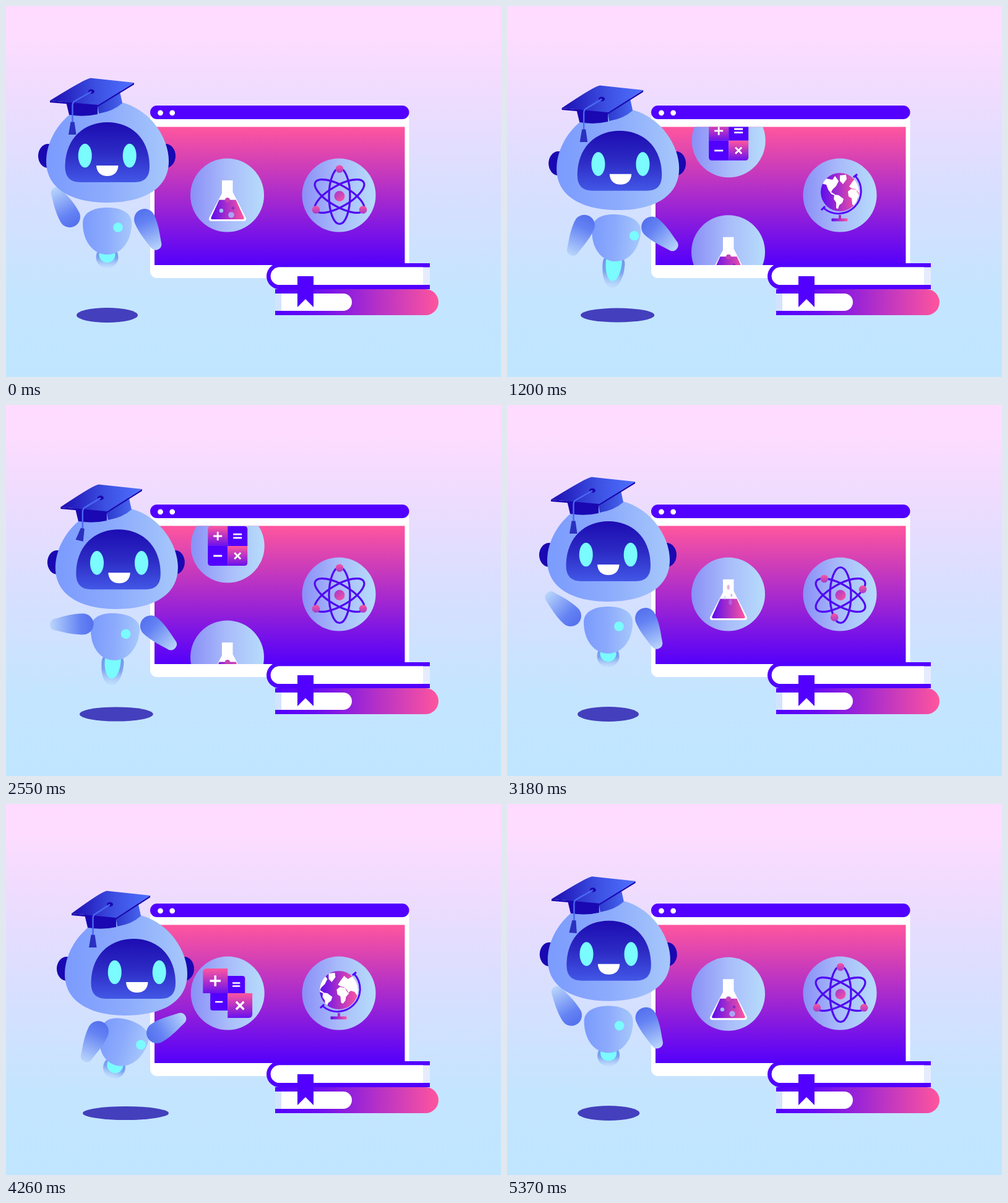
An HTML page for the animation above (5.4 s loop, 800 by 600 pixels).

```html
<!DOCTYPE html>
<html lang="en">
<head>
<meta charset="utf-8">
<title>Robot tutor</title>
<style>
html, body { margin: 0; width: 100%; height: 100%; overflow: hidden; background: #dcdfff; }
svg { display: block; width: 100%; height: 100%; }
</style>
</head>
<body>
<svg id="stage" viewBox="0 0 800 600"></svg>
<script>
const VIOLET = '#5200ff', PINK = '#ff569e', CYAN = '#7afbfe', NAVY = '#1a08b2';

// Gradient: 'h' runs left to right, 'v' top to bottom, 'd' diagonally.
const grad = (id, dir, ...stops) =>
  `<linearGradient id="${id}" x2="${dir === 'v' ? 0 : 1}" y2="${dir === 'h' ? 0 : 1}">` +
  stops.map(([o, c, a = 1]) => `<stop offset="${o}" stop-color="${c}" stop-opacity="${a}"/>`).join('') +
  '</linearGradient>';
const group = (id, inner = '') => `<g id="${id}">${inner}</g>`;
const path = (d, fill, extra = '') => `<path d="${d}" fill="${fill}" ${extra}/>`;
const rect = (x, y, w, h, fill, rx = 0) =>
  `<rect x="${x}" y="${y}" width="${w}" height="${h}" rx="${rx}" fill="${fill}"/>`;
const oval = (x, y, rx, ry, fill, id = '') =>
  `<ellipse ${id && `id="${id}"`} cx="${x}" cy="${y}" rx="${rx}" ry="${ry}" fill="${fill}"/>`;
const dot = (x, y, r, fill, id) => oval(x, y, r, r, fill, id);

const defs = `<defs>
  ${grad('sky', 'v', [0, '#ffdcff'], [.07, '#fedcff'], [.25, '#eedcfe'], [.5, '#d8dfff'], [.78, '#c4e5ff'], [1, '#c0e6ff'])}
  ${grad('screen', 'v', [0, PINK], [1, '#5400fb'])}
  ${grad('disc', 'h', [0, '#8a8ff7'], [.5, '#a9bcfa'], [1, '#b6dcfb'])}
  ${grad('warm', 'h', [0, '#5a0cf0'], [1, PINK])}
  ${grad('warmD', 'd', [0, '#a035d0'], [1, PINK])}
  ${grad('electron', 'v', [0, '#f9549f'], [1, '#a83bc8'])}
  ${grad('keyA', 'v', [0, PINK], [1, '#6a10ee'])}
  ${grad('cover', 'h', [0, VIOLET], [.25, '#6a0cf2'], [1, '#ff559d'])}
  ${grad('shell', 'h', [0, '#7b9bfe'], [.5, '#8dabfc'], [1, '#a6c8fb'])}
  ${grad('face', 'v', [0, '#1d0cb2'], [.5, '#2c2ac4'], [1, '#4257e6'])}
  ${grad('arm', 'h', [0, '#5470ee'], [.3, '#6482f3'], [1, '#b9d6fc'])}
  ${grad('board', 'h', [0, '#1c0eb2'], [.55, '#3c50e2'], [1, '#4f70ff'])}
  ${grad('band', 'h', [0, '#2c38cc'], [1, '#4765ef'])}
  ${grad('flame', 'v', [0, '#6f8fee'], [.55, '#7fa3f0'], [1, '#bcdcfb', .5])}
  <clipPath id="view"><rect x="240" y="195.5" width="404.5" height="223.5"/></clipPath>
  <clipPath id="ball"><circle cy="-5" r="31"/></clipPath>
</defs>`;

// Icons are drawn around the centre of their disc.
const disc = dot(0, 0, 59.5, 'url(#disc)');

const bubbles = [[-9.5, 25, 3.2, '#9fc2fb'], [6.5, 32, 4.8, '#a9a4f6'], [.5, 8, 4, '#c244b4'], [9.5, 21, 2.4, '#8a2ac4']];
const flask = disc +
  path('M-8.5-24H9V-5L30 36Q32 42 26 42H-25Q-31 42-29 36L-8.5-3Z', '#fff') +
  path('M-13 7.5H14L27 36Q28 39 25 39H-24Q-27 39-26 36Z', 'url(#warm)') +
  group('still', bubbles.map(([x, y, r, c]) => dot(x, y, r, c)).join('')) +
  group('rising', bubbles.map(([x, y, r, c]) => dot(x, y, r, c)).join(''));

const keys = [[-1, -1, 'M-7 0H7M0-7V7'], [1, -1, 'M-7-2.8H7M-7 2.8H7'], [-1, 1, 'M-7 0H7'], [1, 1, 'M-5-5L5 5M5-5L-5 5']];
const calc = disc + keys.map(([x, y, sign], i) => group('key' + i,
  path(`M0 0V${32 * y}H${27 * x}Q${32 * x} ${32 * y} ${32 * x} ${27 * y}V0Z`, x === y ? 'url(#keyA)' : VIOLET) +
  path(sign, 'none', `transform="translate(${16 * x} ${16 * y})" stroke="#fff" stroke-width="2.8"`))).join('');

const turns = [0, 120, 240];
const atom = disc + turns.map(a =>
  `<ellipse cx="1" cy="1.5" rx="17" ry="45" fill="none" stroke="#5008f2" stroke-width="3.2" transform="rotate(${a} 1 1.5)"/>`).join('') +
  dot(1, 1.5, 8.5, 'url(#warmD)') +
  turns.map((a, i) => dot(0, 0, 6.3, 'url(#electron)', 'e' + i)).join('');

const land = 'M-52-18L-44-22-34-20-30-26-24-18-28-10-34-4-36 0-31 3-29 6-36 3-41-4-44-12-52-14Z' +
  'M-31 4L-24 5-16 11-18 17-23 21-25 27-28 26-28 17-32 11Z' +
  'M-22-27L-12-28-11-21-17-13-22-18Z' +
  'M-9-1L-4-5 4-4 8 3 11 5 6 11 5 17 1 22-2 20-3 10-8 7Z' +
  'M-7-9L-3-15 3-23 9-18 16-22 28-25 40-22 50-17 46-10 42-4 37 2 33 8 30 3 26 3 24 9 20 3 14 1 10 4 7-1 3-5-3-6Z' +
  'M26 17L32 13 36 14 41 19 36 25 30 22Z';
const globe = disc + dot(0, -5, 31, 'url(#warm)') +
  `<g clip-path="url(#ball)">${path(land, '#fff', 'id="land"')}</g>` +
  path('M25-31A36.5 36.5 0 0 1-26 21', 'none', `stroke="${VIOLET}" stroke-width="2.8"`) +
  path('M22-29L28-34M-30 24L-24 18', 'none', `stroke="${VIOLET}" stroke-width="3"`) +
  rect(-2, 32, 4, 7, '#a330c8') + rect(-13.5, 37.5, 26, 4.8, 'url(#warm)', 1);

const windowArt = rect(233, 172, 418.5, 268, '#fff', 11) + rect(233, 161, 418.5, 22, VIOLET, 11) +
  dot(249.5, 172.8, 4.4, '#fff') + dot(268.7, 172.8, 4.4, '#fff') +
  rect(240, 195.5, 404.5, 223.5, 'url(#screen)') +
  `<g clip-path="url(#view)">${group('flask', flask) + group('calc', calc) + group('atom', atom) + group('globe', globe)}</g>`;

const books =
  path('M435 458H678A21 21 0 0 1 678 500H435Z', 'url(#cover)') +
  rect(435, 465, 20, 28, '#d3e3ff') + path('M445 465H545A14 14 0 0 1 545 493H445Z', '#fff') +
  path('M442 416H685V458H442A21 21 0 0 1 442 416Z', VIOLET) +
  path('M442 422.5H685V451H442A14.2 14.2 0 0 1 442 422.5Z', '#e6ecfe') +
  path('M442 422.5H674V451H442A14.2 14.2 0 0 1 442 422.5Z', '#fff') +
  path('M471 437H497V487L484 474 471 487Z', VIOLET);

const armShape = path('M0-17C20-17 33-12 47-9A9.5 9.5 0 0 1 47 9C33 12 20 17 0 17A17 17 0 0 1 0-17Z', 'url(#arm)');
const body = path('', 'url(#flame)', 'id="outer"') + path('', CYAN, 'id="inner"') +
  path('M-39.5-13C-39.5-30-22-38 0-38S39.5-30 39.5-13C39.5 16 23 38 0 38S-39.5 16-39.5-13Z', 'url(#shell)') +
  dot(17.5, -6, 7.8, CYAN, 'button');

const head = oval(68, 242.5, 16, 19.5, NAVY) + oval(258, 242.5, 16, 19.5, NAVY) +
  path('M164 153C222 153 263 206 263 251C263 297 220 318 164 318S65 297 65 251C65 206 106 153 164 153Z', 'url(#shell)') +
  group('facePlate', path('M95.5 260C95.5 215 125 188 164 188S232 215 232 260Q232 285 208 285H120Q95.5 285 95.5 260Z', 'url(#face)')) +
  group('look', oval(127.7, 242, 11, 19.3, CYAN) + oval(199.7, 242, 11, 19.3, CYAN) +
    path('M146 258H181.5C181 269 174 275 163.7 275S146.500 269 146 258Z', '#fff')) +
  path('M97 155L102 176Q126 180 148 175V154Z', NAVY) +
  path('M147 156L150 174Q174 170 188 157L183 134Z', 'url(#band)') +
  path('', NAVY, 'id="edge"') + path('', 'url(#board)', 'id="board"') +
  oval(138, 138.3, 5, 3.6, NAVY) +
  path('', 'none', 'id="cord" stroke="#4a68f2" stroke-width="2.4"') +
  path('M-3 0H3L6 20.500H-6.500Z', '#2a30c0', 'id="tassel"');

const stage = document.getElementById('stage');
stage.innerHTML = defs + rect(0, 0, 800, 600, 'url(#sky)') + windowArt + books +
  oval(0, 500, 1, 12, '#443fbc', 'shadow') +
  group('body', body) + group('armL', armShape) + group('armR', armShape) + group('head', head);

const el = {};
stage.querySelectorAll('[id]').forEach(n => el[n.id] = n);
const set = (id, attrs) => { for (const k in attrs) el[id].setAttribute(k, attrs[k]); };
const move = (id, x, y, more = '') => set(id, { transform: `translate(${x} ${y}) ${more}` });

const clamp = u => Math.min(1, Math.max(0, u));
const smooth = u => (u = clamp(u), u * u * (3 - 2 * u));
const cubic = u => (u = clamp(u), u < .5 ? 4 * u ** 3 : 1 - 4 * (1 - u) ** 3);
const bump = (t, a, b) => Math.sin(Math.PI * clamp((t - a) / (b - a)));
// Goes 0 to 1 from time a, and back from time b.
const swap = (t, ease, a, b) => ease((t - a) / 300) - ease((t - b) / 300);

function drawIcons(t) {
  const left = swap(t, cubic, 1050, 2408), right = swap(t, cubic, 908, 2250);
  move('flask', 357.5, 306 + 180 * left);
  move('calc', 358.2, 126 + 180 * left);
  move('atom', 538, 306 + 180 * right);
  move('globe', 538, 126 + 180 * right);

  const rise = clamp(t / 800), gather = 1 - .75 * rise;
  set('rising', { opacity: 1 - rise, transform: `translate(0 ${-32 * rise}) scale(${gather} 1)` });
  set('still', { opacity: clamp((t - 700) / 200) });

  const wave = .25 * Math.sin(2 * Math.PI * clamp((t - 1350) / 930));
  keys.forEach(([x, y], i) => {
    const s = x === y ? wave : -wave;
    set('key' + i, { transform: `scale(${1 + (s > 0 ? s : s / 2)})` });
  });

  const a = 2 * Math.PI * smooth(t / 850);
  turns.forEach((turn, i) => {
    const r = turn * Math.PI / 180, x = 17 * Math.sin(a), y = -44 * Math.cos(a);
    move('e' + i, 1 + x * Math.cos(r) - y * Math.sin(r), 1.5 + x * Math.sin(r) + y * Math.cos(r));
  });
  move('land', (1680 - t) * .046, -5);
}

function drawRobot(t) {
  const p = swap(t, smooth, 1050, 2400), q = p * p;
  set('shadow', { cx: 163.5 + 30 * p, rx: 49.5 + 20 * p, ry: 12 - p });

  move('head', 30 * p, 24 * p);
  move('facePlate', 12 * q, 6 * q);
  move('look', 18 * q, 6 * q);
  const L = 71 + 5 * p, T = 137 - 4 * p, R = 207 - 4 * p, B = 149 - p;
  set('board', { d: `M${L} 153Q${T - 8} 117 ${T} 116.500L${R} 124 ${B} 160Z` });
  set('edge', { d: `M${L} 153L${B} 160 ${R} 124V127L${B} 162.500 ${L} 156Z` });
  const hang = 107.5 + 3 * p;
  set('cord', { d: `M138 138.500L${hang + 5} 153Q${hang} 155 ${hang} 161V189` });
  move('tassel', hang, 187.5, `rotate(${14 * bump(t, 2400, 2700)})`);

  move('body', 163.5 + 24.5 * p, 364 + 22 * p, `rotate(${18 * q})`);
  move('button', 12 * swap(t, smooth, 920, 2270), 0);
  const f = 23 * (bump(t, 950, 1350) + bump(t, 2300, 2660));
  const jet = (w, y, h) => `M${-w} ${y}A${w} ${w} 0 0 1 ${w} ${y}C${w} ${y + h * .58} ${w * .56} ${y + h} 0 ${y + h}S${-w} ${y + h * .58} ${-w} ${y}Z`;
  set('outer', { d: jet(18, 42, 18 + f) });
  set('inner', { d: jet(13, 38, 13 + f * .9) });

  const wag = 40 * bump(t, 0, 570);
  const angleL = 242 - wag - 127 * smooth((t - 585) / 300) + 127 * smooth((t - 2400) / 300);
  move('armL', 103 + 41 * p + 5 * q, 341 + 27 * p, `rotate(${angleL})`);
  move('armR', 224 + 20 * p, 345 + 25 * p, `rotate(${66 - 97 * q})`);
}

const start = performance.now();
function tick(now) {
  const t = Math.max(0, now - start) % 2700;
  drawIcons(t);
  drawRobot(t);
  requestAnimationFrame(tick);
}
tick(start);
</script>
</body>
</html>
```
